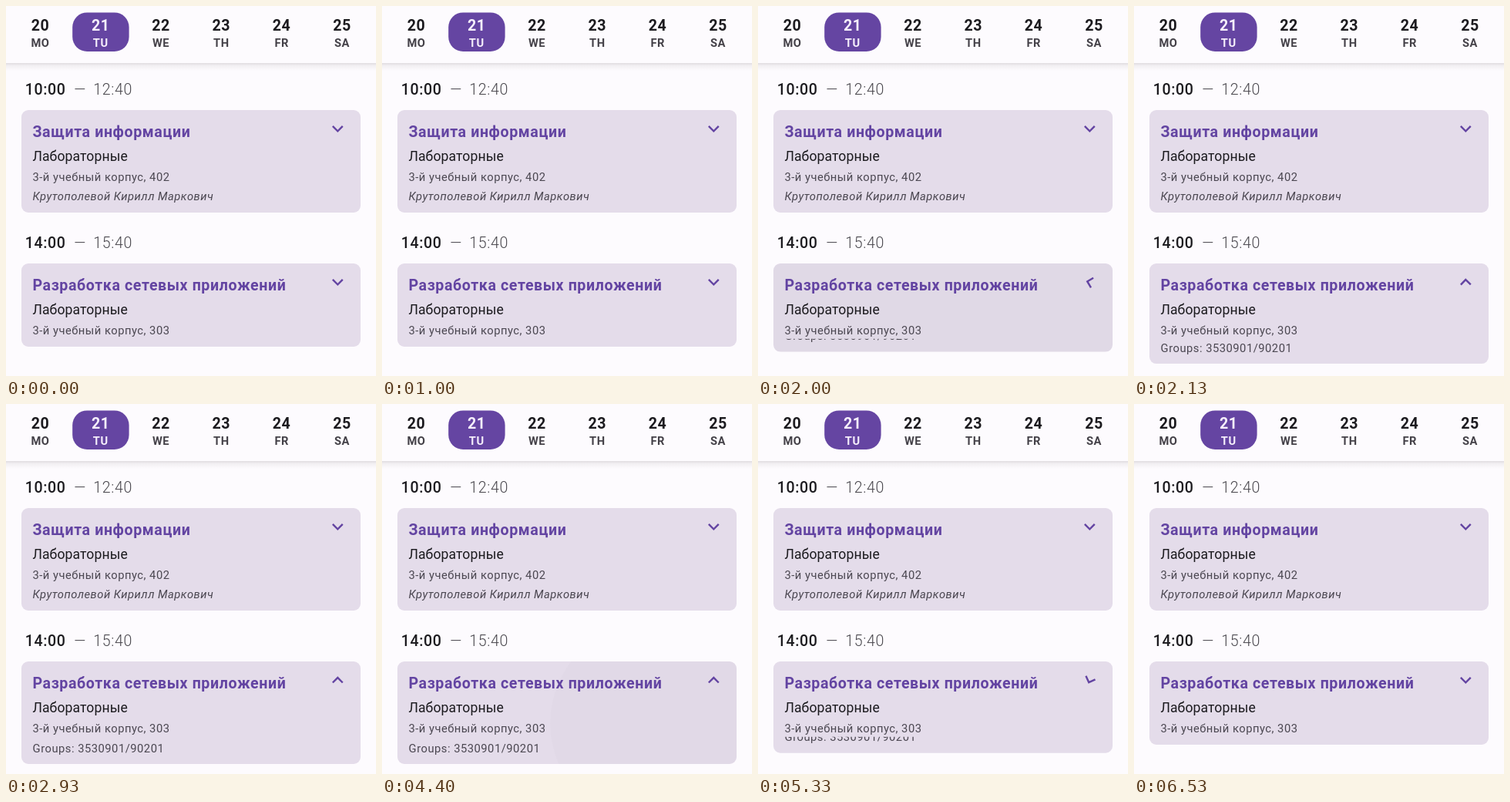
An HTML page for the animation above (6.79 s loop, 480x480 px).

```html
<!DOCTYPE html>
<html lang="ru">
<head>
<meta charset="utf-8">
<title>Schedule</title>
<style>
  html, body { margin: 0; width: 100%; height: 100%; overflow: hidden; background: #fdfbfe; }
  svg { display: block; width: 100%; height: 100%; font-family: Roboto, "Noto Sans", sans-serif; }
  .num { font-size: 19.6px; font-weight: 700; letter-spacing: .5px; fill: #1c1b1f; text-anchor: middle; }
  .day { font-size: 14.7px; font-weight: 700; letter-spacing: .5px; fill: #444148; text-anchor: middle; }
  .on { fill: #f6effc; }
  .time { font-size: 19.6px; letter-spacing: .6px; font-weight: 500; fill: #1c1b1f; }
  .end { font-weight: 300; fill: #49474d; }
  .title { font-size: 19.6px; letter-spacing: .6px; font-weight: 700; fill: #6344a2; }
  .kind { font-size: 17.6px; letter-spacing: .1px; fill: #1c1b1f; }
  .info { font-size: 14.75px; letter-spacing: .5px; fill: #4b4751; }
  .who { font-style: italic; }
</style>
</head>
<body>
<svg id="stage" viewBox="0 0 480 480">
  <defs>
    <linearGradient id="shade" x2="0" y2="1">
      <stop offset="0" stop-color="#4a3c44" stop-opacity=".16"/>
      <stop offset=".35" stop-color="#4a3c44" stop-opacity=".06"/>
      <stop offset="1" stop-color="#4a3c44" stop-opacity="0"/>
    </linearGradient>
    <clipPath id="cardClip"><rect id="clipBox" x="20" y="334" width="440" rx="9"/></clipPath>
    <clipPath id="rowClip"><rect id="rowBox" x="20" y="431.7" width="440"/></clipPath>
  </defs>
</svg>
<script>
const NS = 'http://www.w3.org/2000/svg';
const stage = document.getElementById('stage');
const byId = id => document.getElementById(id);

function set(node, attrs) {
  for (const key in attrs) node.setAttribute(key, attrs[key]);
  return node;
}
function add(tag, attrs, parent = stage) {
  return parent.appendChild(set(document.createElementNS(NS, tag), attrs));
}
function label(text, x, y, cls, parent) {
  const node = add('text', { x, y, class: cls }, parent);
  node.textContent = text;
  return node;
}

// Static layout
const CHEVRON = 'M16.59 8.59 12 13.17 7.41 8.59 6 10l6 6 6-6z';
const pose = (y, angle) =>
  `translate(430.3 ${y}) rotate(${angle}) scale(1.22) translate(-12 -12)`;
const chevron = y => add('path', { d: CHEVRON, fill: '#6344a2', transform: pose(y, 0) });
const cardBox = (y, height) =>
  add('rect', { x: 20, y, width: 440, height, rx: 9, fill: '#e4dcea' });

add('rect', { y: 74, width: 480, height: 10, fill: 'url(#shade)' });
add('rect', { x: 86.2, y: 8.4, width: 73.4, height: 50.6, rx: 19, fill: '#6545a2' });
['MO', 'TU', 'WE', 'TH', 'FR', 'SA'].forEach((day, i) => {
  const x = 44.4 + i * 78.3, on = i === 1 ? ' on' : '';
  label(20 + i, x, 32, 'num' + on);
  label(day, x, 53.3, 'day' + on);
});

function period(from, to, y) {
  label(from, 24.7, y, 'time');
  label('—', 88.2, y, 'time end');
  label(to, 113.3, y, 'time end');
}
function lesson(title, room, top) {
  label(title, 34.4, top + 35.4, 'title');
  label('Лабораторные', 34.4, top + 65.6, 'kind');
  label('3-й учебный корпус, ' + room, 34.4, top + 92, 'info');
}

period('10:00', '12:40', 115);
cardBox(135, 133);
lesson('Защита информации', 402, 135);
label('Крутополевой Кирилл Маркович', 34.4, 252, 'info who');
chevron(159.2);

period('14:00', '15:40', 314);
const card = cardBox(334, 108);
const ripple = add('circle', { fill: '#000' }, add('g', { 'clip-path': 'url(#cardClip)' }));
lesson('Разработка сетевых приложений', 303, 334);
const groups = label('Groups: 3530901/90201', 34.6, 451, 'info',
  add('g', { 'clip-path': 'url(#rowClip)' }));
const arrow = chevron(358.2);

// Motion
const LOOP = 6790, FPS = 15, ROW = 25;
const OPEN = 1950, CLOSE = 5237;
const taps = [
  { x: 352, y: 408, down: 1232, up: 1880 },
  { x: 357, y: 415, down: 4388, up: 5170 }
];
const clamp = v => Math.min(1, Math.max(0, v));
const mix = (a, b, p) => a + (b - a) * p;

// Share of the way left for a critically damped spring
function left(ms, stiffness) {
  if (ms <= 0) return 1;
  const x = Math.sqrt(stiffness) * ms / 1000;
  return (1 + x) * Math.exp(-x);
}
const openness = (t, stiffness) =>
  t < CLOSE ? 1 - left(t - OPEN, stiffness) : left(t - CLOSE, stiffness);

// cubic-bezier(.4, 0, .2, 1)
function ease(p) {
  let lo = 0, hi = 1;
  for (let i = 0; i < 20; i++) {
    const s = (lo + hi) / 2, r = 1 - s;
    if (1.2 * r * r * s + .6 * r * s * s + s ** 3 < p) lo = s; else hi = s;
  }
  return 3 * (1 - lo) * lo * lo + lo ** 3;
}

function draw(t) {
  const extra = ROW * openness(t, 400);
  const height = 108 + extra;
  set(card, { height });
  set(byId('clipBox'), { height });
  set(byId('rowBox'), { height: extra });
  set(groups, { y: 426.6 + extra });
  set(arrow, { transform: pose(358.2, 180 * openness(t, 1500)) });

  const tap = t < 3000 ? taps[0] : taps[1];
  const p = clamp((t - tap.down) / 225);
  const alpha = clamp((t - tap.down) / 75) * (1 - clamp((t - tap.up) / 150));
  set(ripple, {
    cx: mix(tap.x, 240, p),
    cy: mix(tap.y, 334 + height / 2, p),
    r: mix(132, Math.hypot(440, height) / 2 + 12, ease(p)),
    'fill-opacity': .08 * alpha
  });
}

const start = performance.now();
function tick() {
  const t = (performance.now() - start) % LOOP;
  draw(Math.floor(t * FPS / 1000 + .06) * 1000 / FPS);
  requestAnimationFrame(tick);
}
tick();
</script>
</body>
</html>
```
